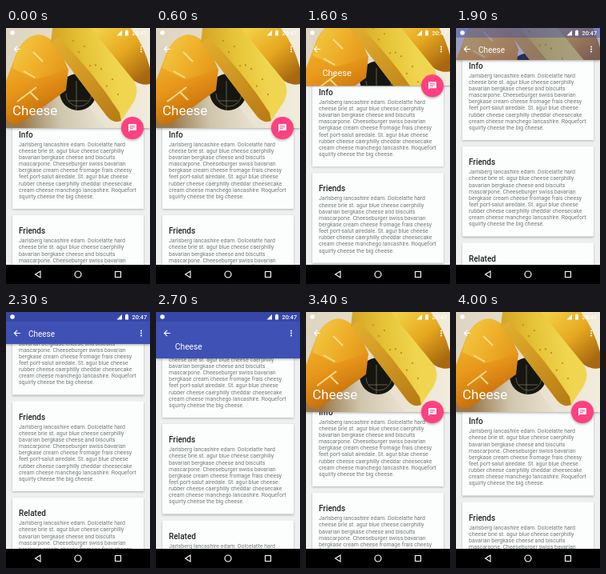
An HTML page with a canvas that plays this animation: 180x320 px, repeating every 4100 ms.

```html
<!DOCTYPE html>
<html lang="en">
<head>
<meta charset="utf-8">
<title>Collapsing cheese header</title>
<style>
html, body { margin: 0; width: 100%; height: 100%; overflow: hidden; background: #000; }
canvas { display: block; width: 180px; height: 320px; }
</style>
</head>
<body>
<canvas id="stage"></canvas>
<script>
const LOOP = 4100, STEP = 100, OPEN = 125, CLOSED = 40;
const canvas = document.getElementById('stage');
const ratio = window.devicePixelRatio || 1;
canvas.width = 180 * ratio;
canvas.height = 320 * ratio;
const ctx = canvas.getContext('2d');
ctx.scale(ratio, ratio);

const LINES = [
  'Jarlsberg lancashire edam. Dolcelatte hard',
  'cheese brie st. agur blue cheese caerphilly',
  'bavarian bergkase cheese and biscuits',
  'mascarpone. Cheeseburger swiss bavarian',
  'bergkase cream cheese fromage frais cheesy',
  'feet port-salut airedale. St. agur blue cheese',
  'rubber cheese caerphilly cheddar cheesecake',
  'cream cheese manchego lancashire. Roquefort',
  'squirty cheese the big cheese.'
];

// [time, value] pairs: header height, and card offset below the header
const HEIGHT = [[900, 125], [1200, 107], [1650, 68], [1900, 40], [2540, 40], [2700, 58], [3000, 104], [3250, 125]];
const OFFSET = [[0, -11.5], [900, -11.5], [1200, -10.5], [1900, -12.5], [2250, -48], [2450, -52],
  [2700, -38.5], [3400, -19.5], [4000, -8]];

const mix = (a, b, f) => a + (b - a) * f;
const ramp = (t, start, length) => Math.min(1, Math.max(0, (t - start) / length));

function track(points, t) {
  if (t <= points[0][0]) return points[0][1];
  for (let i = 1; i < points.length; i++) {
    const [t0, v0] = points[i - 1], [t1, v1] = points[i];
    if (t <= t1) return mix(v0, v1, (t - t0) / (t1 - t0));
  }
  return points[points.length - 1][1];
}

function rect(color, x, y, w, h) {
  ctx.fillStyle = color;
  ctx.fillRect(x, y, w, h);
}

function circle(color, x, y, r) {
  ctx.fillStyle = color;
  ctx.beginPath();
  ctx.arc(x, y, r, 0, 7);
  ctx.fill();
}

function shape(path, color) {
  ctx.fillStyle = color;
  ctx.fill(new Path2D(path));
}

function stroke(path, color, width) {
  ctx.strokeStyle = color;
  ctx.lineWidth = width;
  ctx.stroke(new Path2D(path));
}

function text(str, x, y, size, color, weight = 400) {
  ctx.font = `${weight} ${size}px Roboto, sans-serif`;
  ctx.fillStyle = color;
  ctx.fillText(str, x, y);
}

function shadow(alpha, blur, y) {
  ctx.shadowColor = `rgba(0,0,0,${alpha})`;
  ctx.shadowBlur = blur * ratio;
  ctx.shadowOffsetY = y * ratio;
}

function shade(x0, y0, x1, y1, ...colors) {
  const g = ctx.createLinearGradient(x0, y0, x1, y1);
  colors.forEach((c, i) => g.addColorStop(i / (colors.length - 1), c));
  return g;
}

function photo() {
  rect(shade(0, 0, 180, 0, '#ddd5c0', '#e6dfcc', '#f1ecdc'), 0, 0, 180, OPEN);
  // shadow on the plate and its dark emblem
  shape('M0 125V112L78 66 124 125Z', shade(20, 120, 115, 110, '#99794a', '#cfc5ac', '#e6dfcc'));
  circle('#15160f', 90, 80, 23);
  stroke('M75 82A16 16 0 0 0 107 82M88 66V102M78 91L102 91', '#76705a', .8);
  // whole cheese on the left
  shape('M0 66L10 40Q18 14 36 9Q52 6 66 26L78 52 75 78 20 118Q4 124 0 112Z',
    shade(8, 30, 45, 112, '#f2b52a', '#e8971a', '#c56c0a'));
  shape('M8 50Q16 16 36 9Q52 6 66 26L77 50Q56 60 36 64Z',
    shade(16, 20, 70, 52, '#f2c53f', '#efb02a', '#e59a1c'));
  stroke('M22 54L36 62M14 92L38 74M30 80L40 90M34 30L46 42', '#f8dc8c', 2);
  // wedge behind
  shape('M104 0H156Q172 20 180 50V70Q164 74 146 54Z',
    shade(118, 0, 168, 64, '#f2cf45', '#e7a820', '#a8680f'));
  // main wedge
  shape('M58 0H106L160 66Q167 78 160 92L144 116Q134 120 126 110L56 18Z',
    shade(66, 40, 136, 30, '#d6a827', '#e6c437', '#f0d650'));
  shape('M56 18L66 12Q110 56 142 106L144 116Q134 120 126 110Z',
    shade(60, 14, 134, 114, '#e2ae2e', '#cf9622', '#b97d16'));
  for (let i = 0; i < 9; i++) circle('#bd8c1c', 84 + i * 7, 16 + i * 8 + 9 * Math.sin(i * 2.4), 1.1);
}

function card(title, top) {
  ctx.save();
  shadow(.25, 2.5, 1);
  rect('#fbfefc', 8, top, 164, 112.5);
  ctx.restore();
  text(title, 16, top + 23, 10, '#212523', 500);
  LINES.forEach((line, i) => text(line, 16, top + 34.2 + i * 8.15, 7, '#747976'));
}

function header(h, scrim) {
  const f = (OPEN - h) / (OPEN - CLOSED);
  ctx.save();
  shadow(.35, 3, 1);
  rect('#3f51b5', 0, 0, 180, h);
  ctx.restore();

  ctx.save();
  ctx.beginPath();
  ctx.rect(0, 0, 180, h);
  ctx.clip();
  ctx.translate(0, -.3 * (OPEN - h));
  photo();
  ctx.restore();

  ctx.globalAlpha = scrim;
  rect('#3f51b5', 0, 0, 180, h);
  rect('#3747a8', 0, 0, 180, 12);
  ctx.globalAlpha = 1;

  const size = mix(17, 10, 1 - (1 - f) ** 2);
  text('Cheese', mix(8, 28, f), mix(109, 30.5, f), size, '#fff');
  stroke('M18 26.5H10.5M14 22.8L10.3 26.5 14 30.2', '#fff', 1.1);
  [23.5, 26.5, 29.5].forEach(y => circle('#fff', 169, y, 1));
}

function statusBar() {
  circle('#fff', 8, 6, 2.8);
  shape('M145 3V9.5H138.5Z', '#fff');
  shape('M149 3.5H150V2.7H152V3.5H153V9.5H149Z', '#fff');
  text('20:47', 157.5, 9, 7.3, '#fff', 500);
}

function button(y, scale) {
  if (!scale) return;
  ctx.save();
  ctx.translate(158, y);
  ctx.scale(scale, scale);
  ctx.globalAlpha = scale;
  shadow(.3, 3, 1.5);
  circle('#ff4081', 0, 0, 14);
  shadow(0, 0, 0);
  shape('M-4 -5H4Q5 -5 5 -4V2Q5 3 4 3H-3L-5 5V-4Q-5 -5 -4 -5Z', '#fff');
  stroke('M-3 -2.7H3M-3 -1H3M-3 .7H1', '#ff4081', .8);
  ctx.restore();
}

function navBar() {
  rect('#000', 0, 296, 180, 24);
  stroke('M43 304V312L36.5 308Z', '#fff', 1.1);
  stroke('M94 308A4 4 0 1 1 86 308A4 4 0 1 1 94 308', '#fff', 1.2);
  stroke('M136.5 304.5H143.5V311.5H136.5Z', '#fff', 1.1);
}

function draw(t) {
  const h = track(HEIGHT, t);
  const top = h + track(OFFSET, t);
  rect('#edf0ee', 0, 0, 180, 320);
  ['Info', 'Friends', 'Related'].forEach((title, i) => card(title, top + i * 120.5));
  header(h, ramp(t, 1650, 600) - ramp(t, 2770, 500));
  statusBar();
  button(h, 1 - ramp(t, 1650, 200) + ramp(t, 2770, 200));
  navBar();
}

function frame() {
  draw(Math.floor(performance.now() % LOOP / STEP) * STEP);
  requestAnimationFrame(frame);
}
frame();
</script>
</body>
</html>
```
